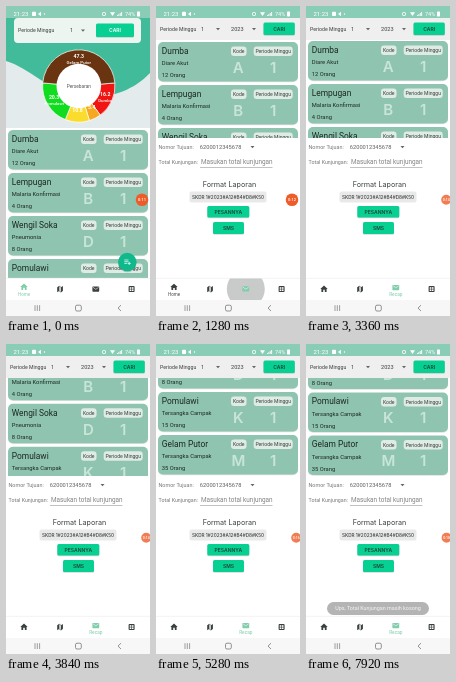
Animation of 144x310 px, one loop 8 s. Source, as an HTML page with a canvas:

```html
<!DOCTYPE html>
<html lang="id">
<head>
<meta charset="utf-8">
<title>Laporan mingguan</title>
<style>
html, body { margin: 0; width: 100%; height: 100%; overflow: hidden; background: #fff; }
canvas { display: block; width: 144px; height: 310px; }
</style>
</head>
<body>
<canvas id="stage"></canvas>
<script>
const W = 144, H = 310, LOOP = 8000;
const canvas = document.getElementById('stage');
const c = canvas.getContext('2d');
const ratio = window.devicePixelRatio || 1;
canvas.width = W * ratio;
canvas.height = H * ratio;

const GREEN = '#08d092', CARD = '#8fc5b0', PALE = '#c9e5d8', PILL = '#dfece5';
const DARK = '#3a403e', INK = '#1c2622', GREY = '#777', MINT = '#7fcdaa', STRIP = '#8acdb7';
const ROBOTO = 'Roboto, Arial, sans-serif', WIDE = 'Inter, "Open Sans", sans-serif';
const areas = [
  { name: 'Dumba', ill: 'Diare Akut', count: 12, code: 'A', color: '#f01512' },
  { name: 'Lempugan', ill: 'Malaria Konfirmasi', count: 4, code: 'B', color: '#f6a821' },
  { name: 'Wengil Soka', ill: 'Pneumonia', count: 8, code: 'D', color: '#f9dc2c' },
  { name: 'Pomulawi', ill: 'Tersangka Campak', count: 15, code: 'K', color: '#12dc20' },
  { name: 'Gelam Putor', ill: 'Tersangka Campak', count: 35, code: 'M', color: '#6a3410' }
];
const total = areas.reduce((sum, a) => sum + a.count, 0);

const clamp = v => Math.max(0, Math.min(1, v));
const ease = v => v * v * (3 - 2 * v);
const ramp = (t, from, to) => ease(clamp((t - from) / (to - from)));

// Interpolates between [time, value] stops.
function track(t, stops) {
  let [t0, v0] = stops[0];
  for (const [t1, v1] of stops) {
    if (t < t1) return v0 + (v1 - v0) * clamp((t - t0) / (t1 - t0));
    t0 = t1; v0 = v1;
  }
  return v0;
}

function text(s, x, y, size, color = DARK, align = 'left', weight = 400, font = ROBOTO) {
  c.font = `${weight} ${size}px ${font}`;
  c.textAlign = align;
  c.textBaseline = 'middle';
  c.fillStyle = color;
  c.fillText(s, x, y + size * 0.05);
}
const mid = (s, x, y, size, color, weight, font) => text(s, x, y, size, color, 'center', weight, font);

function rect(x, y, w, h, color, r = 0) {
  c.fillStyle = color;
  c.beginPath();
  c.roundRect(x, y, w, h, r);
  c.fill();
}
function disc(x, y, r, color) {
  c.fillStyle = color;
  c.beginPath();
  c.arc(x, y, r, 0, Math.PI * 2);
  c.fill();
}
function poly(points, color) {
  c.fillStyle = color;
  c.beginPath();
  points.forEach(([x, y]) => c.lineTo(x, y));
  c.fill();
}
function line(points, color, width = 0.8) {
  c.strokeStyle = color;
  c.lineWidth = width;
  c.beginPath();
  points.forEach(([x, y], i) => i ? c.lineTo(x, y) : c.moveTo(x, y));
  c.stroke();
}
const arrow = (x, y) => poly([[x - 2, y - 1], [x + 2, y - 1], [x, y + 1.2]], '#666');

function button(label, x, y, w, h, color) {
  rect(x, y + 0.7, w, h, 'rgba(0,0,0,.16)', 1.5);
  rect(x, y, w, h, GREEN, 1.5);
  mid(label, x + w / 2, y + h / 2, 5, color, 600, WIDE);
}

function statusBar() {
  const color = '#fff';
  rect(0, 0, W, 12, STRIP);
  text('21:23', 7.5, 8, 6, color);
  rect(26, 5.8, 4, 4.2, color, 0.8);
  poly([[32, 8], [35, 5.8], [35, 10.2]], color);
  disc(38.5, 8, 0.7, color);
  disc(98, 8, 2, color);
  disc(98, 8, 1.2, STRIP);
  poly([[104, 6.2], [109, 6.2], [106.5, 10]], color);
  for (let i = 0; i < 4; i++) rect(111 + i * 1.4, 9 - i, 0.9, 1 + i, color);
  text('74%', 119, 8, 5.5, color);
  rect(131, 5.6, 3, 4.8, color, 0.6);
}

function card(a, y) {
  rect(2, y + 0.8, 140, 39.5, 'rgba(0,0,0,.12)', 5);
  rect(2, y, 140, 39.5, CARD, 5);
  text(a.name, 5.8, y + 9, 8.4, INK);
  text(a.ill, 5.8, y + 21.3, 5.8, INK);
  text(a.count + ' Orang', 5.8, y + 33, 5.8, INK);
  rect(75, y + 4.5, 15.5, 9.5, PILL, 3);
  mid('Kode', 82.7, y + 9.3, 5.1);
  rect(97.7, y + 4.5, 39, 9.5, PILL, 3);
  mid('Periode Minggu', 117.2, y + 9.3, 5.1);
  mid(a.code, 82.3, y + 25.5, 15, PALE, 600, WIDE);
  mid('1', 117.2, y + 25.5, 15, PALE, 600, WIDE);
}

function cardList(top, bottom, first, scroll) {
  c.save();
  c.beginPath();
  c.rect(0, top, W, bottom - top);
  c.clip();
  areas.forEach((a, i) => card(a, first + i * 43 - scroll));
  c.restore();
}

function donut() {
  const x = 72.8, y = 80, outer = 36.2;
  const share = a => a.count / total * Math.PI * 2;
  let angle = share(areas[4]) / 2 - Math.PI / 2;
  const slices = areas.map(a => {
    const start = angle;
    angle += share(a);
    c.beginPath();
    c.moveTo(x, y);
    c.arc(x, y, outer, start, angle);
    c.closePath();
    c.fillStyle = a.color;
    c.fill();
    c.strokeStyle = '#fff';
    c.lineWidth = 0.7;
    c.stroke();
    return [a, (start + angle) / 2];
  });
  disc(x, y, 22.3, '#fff');
  mid('Persebaran', x, y, 4.8, '#555');
  for (const [a, turn] of slices) {
    const px = x + Math.cos(turn) * 29, py = y + Math.sin(turn) * 27;
    mid((a.count / total * 100).toFixed(1), px, py - 2.6, 5.2, '#fff', 700);
    if (a.count > 10) mid(a.name, px, py + 3, 4.4, '#fff', 500);
  }
}

function homePage() {
  rect(0, 0, W, 122, '#e4ebec');
  c.fillStyle = '#42bb9b';
  c.fill(new Path2D('M0 0H144V67C124 88 96 94 72 90C42 85 24 62 0 55Z'));
  statusBar();
  rect(8, 12, 127, 25, '#edf5f0', 4);
  text('Periode Minggu', 12, 24.5, 5.2);
  text('1', 64, 24.5, 5.6);
  arrow(77, 24.5);
  button('CARI', 90, 17.5, 38, 13.5, '#fff');
  donut();
  cardList(122, 272, 124, 0);
  disc(121.3, 257, 9.3, 'rgba(0,0,0,.18)');
  disc(121.3, 256, 9.2, '#0fb98c');
  for (let i = 0; i < 3; i++) line([[118.3, 254 + i * 1.7], [i < 2 ? 122.5 : 121, 254 + i * 1.7]], '#fff', 0.7);
  line([[121.6, 257.4], [124.8, 257.4]], '#fff', 0.7);
  line([[123.2, 255.8], [123.2, 259]], '#fff', 0.7);
}

function recapPage(t) {
  statusBar();
  rect(0, 12, W, 22, '#efefef');
  text('Periode Minggu', 4, 23, 5.2);
  text('1', 45, 23, 5.6);
  arrow(62, 23);
  text('2023', 75, 23, 5.6);
  arrow(98, 23);
  button('CARI', 107.5, 16.5, 31.3, 12.5, '#174635');

  const scroll = track(t, [[3280, 0], [3360, 1], [3600, 1], [3680, 14], [3760, 38], [3840, 62],
    [3920, 79], [4000, 88], [4160, 88], [4240, 90], [4480, 90], [4560, 95], [4720, 106],
    [4880, 114], [5040, 117], [5280, 117], [5600, 118], [6080, 116.5]]);
  cardList(34, 132, 36, scroll);

  text('Nomor Tujuan:', 2.5, 141, 5.4, GREY);
  text('6200012345678', 43.8, 141, 5.7, '#5c5c5c');
  arrow(96.5, 141);
  text('Total Kunjungan:', 2.5, 156, 5.3, GREY);
  text('Masukan total kunjungan', 45, 156, 6.4, '#838383');
  line([[44, 161.5], [116.5, 161.5]], '#999', 0.6);
  mid('Format Laporan', 73.5, 178, 7.2, DARK, 400, WIDE);
  rect(33.5, 185.5, 77, 11, '#e9e9e9', 2);
  mid('SKDR 1#2023#A12#B4#D8#K50', 72, 191, 4.7, DARK, 500, WIDE);
  button('PESANNYA', 51.3, 200, 42, 11.5, '#174635');
  button('SMS', 57, 216, 31, 12, '#174635');

  const press = clamp((t - 7520) / 320);
  if (press > 0 && press < 1) {
    c.save();
    c.beginPath();
    c.roundRect(57, 216, 31, 12, 1.5);
    c.clip();
    disc(72, 222, 18 * press, `rgba(255,255,255,${0.3 * (1 - press)})`);
    c.restore();
  }
  const toast = ramp(t, 7640, 7920);
  if (toast > 0) {
    c.globalAlpha = toast;
    rect(21, 258, 102, 13, '#b4b4b4', 6.5);
    mid('Ups, Total Kunjungan masih kosong', 72, 264.5, 5.4, '#f6f6f6');
    c.globalAlpha = 1;
  }
}

function homeIcon(y, color) {
  poly([[14.3, y], [18, y - 3.4], [21.7, y], [20.6, y], [20.6, y + 3], [18.8, y + 3],
    [18.8, y + 0.8], [17.2, y + 0.8], [17.2, y + 3], [15.4, y + 3], [15.4, y]], color);
}
function mailIcon(y, color) {
  rect(86.4, y - 2.6, 6.8, 5.3, color, 0.7);
  line([[87, y - 1.7], [89.8, y + 0.3], [92.6, y - 1.7]], '#fff', 0.6);
}

function navBar(t) {
  const swap = ramp(t, 1240, 1520), active = t >= 1120;
  rect(0, 272, W, 38, '#fff');
  line([[0, 272.3], [W, 272.3]], '#e9e9e9', 0.6);

  const grow = clamp((t - 960) / 320), fade = 1 - ramp(t, 1320, 1760);
  if (grow > 0 && fade > 0) {
    c.save();
    c.beginPath();
    c.rect(0, 272.5, W, 21.5);
    c.clip();
    disc(89.8, 283, 19 * ease(grow), `rgba(120,125,123,${0.4 * fade})`);
    c.restore();
  }
  homeIcon(281 + 2 * swap, active ? DARK : MINT);
  mailIcon(283 - 1.5 * swap, active ? MINT : DARK);
  c.globalAlpha = 1 - swap;
  mid('Home', 18, 288.3, 4.5, active ? DARK : MINT);
  c.globalAlpha = swap;
  mid('Recap', 89.8, 288.3, 4.8, MINT);
  c.globalAlpha = 1;

  // Folded map: three slanted panels, the middle one hollow.
  for (let i = 0; i < 3; i++) {
    const s = i % 2 ? 0.6 : -0.6, x = 51.2 + i * 1.9;
    const panel = [[x, 280.6 - s], [x + 1.9, 280.6 + s], [x + 1.9, 285.6 + s], [x, 285.6 - s], [x, 280.6 - s]];
    if (i === 1) line(panel, DARK, 0.5);
    else poly(panel, DARK);
  }
  rect(122.6, 280.1, 6, 6, DARK, 0.8);
  for (let i = 0; i < 4; i++) rect(123.7 + (i % 2) * 2.2, 281.2 + (i >> 1) * 2.2, 1.6, 1.6, '#fff');

  rect(0, 294, W, 16, '#f7f7f7');
  for (let i = 0; i < 3; i++) line([[29 + i * 2.3, 299.2], [29 + i * 2.3, 305]], '#777', 0.7);
  c.lineWidth = 0.8;
  c.strokeStyle = '#777';
  c.beginPath();
  c.roundRect(69.5, 299.2, 5.8, 5.8, 1.5);
  c.stroke();
  line([[115, 299.2], [112, 302.1], [115, 305]], '#777');
}

function recorder(t) {
  const x = track(t, [[1640, 136], [1840, 140.2], [6720, 140.2], [6800, 138.7], [6960, 138.7], [7040, 140.6]]);
  const docked = ramp(t, 1640, 1840);
  const r = 6.3 - 1.3 * docked;
  c.globalAlpha = 1 - 0.2 * docked;
  disc(x, 193.7, r, '#ee5c2a');
  c.globalAlpha = 1;
  const sec = String(11 + Math.floor(t / 1000)).padStart(2, '0');
  mid('0:' + sec, x, 193.7, 4 - 0.5 * docked, '#fff', 500);
}

function draw(now) {
  const t = now % LOOP;
  c.setTransform(ratio, 0, 0, ratio, 0, 0);
  rect(0, 0, W, H, '#fff');
  if (t < 1120) homePage();
  else recapPage(t);
  navBar(t);
  recorder(t);
}

const begin = performance.now();
function frame() {
  draw(performance.now() - begin);
  requestAnimationFrame(frame);
}
frame();
</script>
</body>
</html>
```
